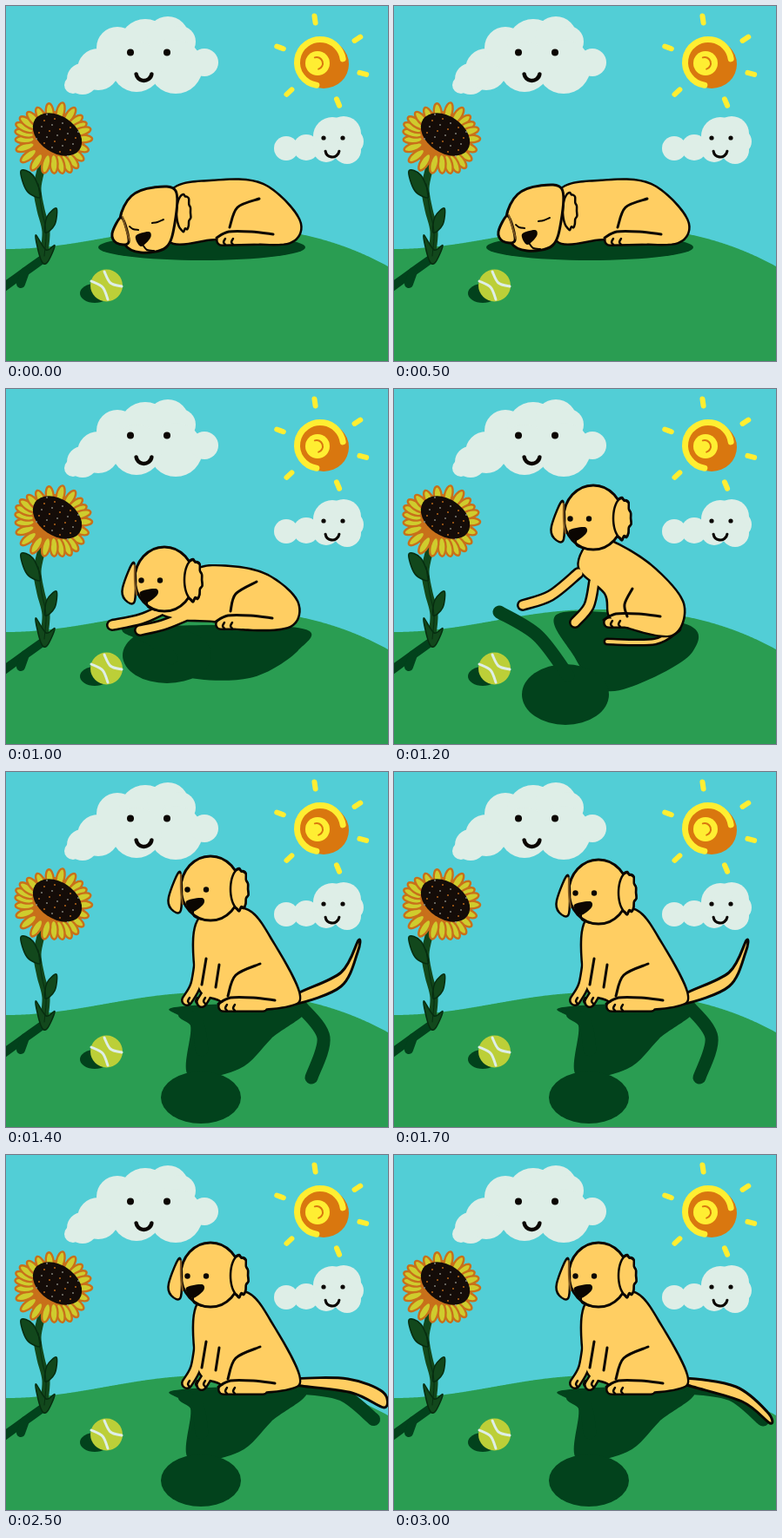
Write an HTML page with a canvas that moves like this. It is 439 px wide and 409 px high and loops after 3100 ms.

```html
<!DOCTYPE html>
<html lang="en">
<head>
<meta charset="utf-8">
<title>Sleepy puppy</title>
<style>
html, body { margin: 0; width: 100%; height: 100%; overflow: hidden; background: #52ced6; }
canvas { display: block; }
</style>
</head>
<body>
<canvas id="stage" width="439" height="409"></canvas>
<script>
const g = document.getElementById('stage').getContext('2d');
const INK = '#0b0602', FUR = '#ffce62', SHADE = '#02421c', CLOUD = '#deeee7', GRASS = '#2a9d52',
  YELLOW = '#ffee32', ORANGE = '#d9770f', STEM = '#12481c', VEIN = '#072d10';
const { PI, sin, cos, min, max, floor } = Math;
g.lineCap = g.lineJoin = 'round';

const clamp = (v, lo, hi) => max(lo, min(hi, v));
const nums = s => typeof s === 'string' ? s.split(' ').map(Number) : s;

// Blend neighbouring poses; u = 1.5 is halfway from the second to the third
function mix(poses, u) {
  const i = min(floor(u), poses.length - 2), b = nums(poses[i + 1]);
  return nums(poses[i]).map((v, j) => v + (b[j] - v) * (u - i));
}

// Smooth curve through the points
function trace(points, closed) {
  const p = nums(points), n = p.length / 2;
  const at = i => {
    i = closed ? (i + n) % n : clamp(i, 0, n - 1);
    return [p[2 * i], p[2 * i + 1]];
  };
  g.beginPath();
  g.moveTo(...at(0));
  for (let i = 0; i < (closed ? n : n - 1); i++) {
    const [a, b, c, d] = [at(i - 1), at(i), at(i + 1), at(i + 2)];
    g.bezierCurveTo(b[0] + (c[0] - a[0]) / 6, b[1] + (c[1] - a[1]) / 6,
      c[0] - (d[0] - b[0]) / 6, c[1] - (d[1] - b[1]) / 6, c[0], c[1]);
  }
}

function ink(color, width) {
  g.strokeStyle = color;
  g.lineWidth = width;
  g.stroke();
}

function fill(color) {
  g.fillStyle = color;
  g.fill();
}

function blob(p, color, edge, width = 3) {
  trace(p, true);
  fill(color);
  if (edge) ink(edge, width);
}

function line(p, width = 3, color = INK) {
  trace(p, false);
  ink(color, width);
}

function oval(x, y, rx, ry, color, turn = 0) {
  g.beginPath();
  g.ellipse(x, y, rx, ry, turn, 0, 2 * PI);
  fill(color);
}

function arc(x, y, r, from, to, width, color) {
  g.beginPath();
  g.arc(x, y, r, from, to);
  ink(color, width);
}

function shaggy(x, y, rx, ry) {
  const p = [];
  for (let i = 0; i < 24; i++) {
    const a = i * PI / 12, r = 1 + .1 * sin(i * 2.2) * (cos(a) > 0);
    p.push(x + rx * r * cos(a), y + ry * r * sin(a));
  }
  blob(p, FUR, INK, 2.5);
}

function shifted(x, y, draw) {
  g.save();
  g.translate(x, y);
  draw();
  g.restore();
}

// Puffs are triples of x, y, radius
function cloud(puffs, eyeX, eyeY, gap, eye, smileX, smileY, smile) {
  const p = nums(puffs);
  for (let i = 0; i < p.length; i += 3) oval(p[i], p[i + 1], p[i + 2], p[i + 2], CLOUD);
  oval(eyeX, eyeY, eye, eye, INK);
  oval(eyeX + gap, eyeY, eye, eye, INK);
  arc(smileX, smileY, smile, .05 * PI, .95 * PI, eye + .5, INK);
}

function sun() {
  for (const degrees of [-98, -160, -33, 15, 137, 67]) {
    const a = degrees * PI / 180, x = cos(a), y = sin(a);
    line([362 + 46 * x, 65 + 46 * y, 362 + 54 * x, 65 + 54 * y], 6, YELLOW);
  }
  oval(365, 67, 29, 28, ORANGE);
  arc(361, 65, 26.5, .55 * PI, 1.95 * PI, 7, YELLOW);
  oval(358, 66, 14, 14, YELLOW);
  arc(357, 66, 7, -.6 * PI, .4 * PI, 2, ORANGE);
}

function hill() {
  const crest = x => x < 230 ? 280 - 26 * sin(x / 230 * PI / 2) ** 2 : 254 + 46 * ((x - 230) / 209) ** 2.5;
  g.beginPath();
  g.moveTo(0, 409);
  for (let x = 0; x <= 439; x++) g.lineTo(x, crest(x));
  g.lineTo(439, 409);
  fill(GRASS);
}

function flower() {
  line('43 291 22 306 -4 325', 10, SHADE);
  line('22 306 17 320', 10, SHADE);
  line('41 185 36 210 40 235 46 260 43 290', 9, STEM);
  for (const leaf of ['17 190 31 195 40 220 24 213', '45 261 47 243 58 233 56 252', '40 292 34 264 46 281 56 276 47 296'])
    blob(leaf, STEM, VEIN, 1.5);
  line('37 205 41 235 46 260 44 288', 1, VEIN);

  oval(54, 153, 36, 32, '#c8701a');
  const petals = 23;
  for (let i = 0; i < petals; i++) {
    const a = (i + .4 * sin(i * 7)) * 2 * PI / petals, r = .74 + .04 * sin(i * 5);
    oval(54 + 46 * r * cos(a), 153 + 41 * r * sin(a), 11, 4.5, '#cfcc2d', a);
    ink('#c8701a', 2.4);
  }
  oval(59, 148, 31, 21, '#140c08', .6);
  for (let y = -2; y < 3; y++)
    for (let x = -2; x < 3; x++)
      oval(59 + x * 9 - y * 3, 149 + y * 7 + x * 5, .9, .9, (x + y) % 2 ? '#c8701a' : '#8b8d83');
}

function ball() {
  oval(102, 331, 17, 11, SHADE);
  oval(115.5, 322, 18.5, 18.5, '#bccf38');
  line('98 317 111 324 117 338', 3, CLOUD);
  line('113 306 120 319 133 323', 3, CLOUD);
}

function scenery() {
  g.fillStyle = '#52ced6';
  g.fillRect(0, 0, 439, 409);
  cloud('77 91 10 88 84 18 106 73 24 128 48 24 160 45 30 186 36 24 200 41 18 195 70 31 150 70 29 228 65 16',
    143, 53.5, 42, 4, 158.5, 77, 9);
  cloud('322 164 14 345 163 15 375 150 22 388 147 20 396 156 15 392 166 16 368 165 15',
    365, 152, 22, 2.6, 375, 166, 8);
  sun();
  hill();
  flower();
  ball();
}

// Torso and limbs share one outline
function silhouette(torso, limbs, thick) {
  for (const limb of limbs) line(limb, thick + 5);
  blob(torso, FUR, INK, 5);
  for (const limb of limbs) line(limb, thick, FUR);
  trace(torso, true);
  fill(FUR);
}

function toes(x, y, count) {
  for (; count--; x += 9) line([x, y, x - 2, y + 4, x, y + 7], 2.5);
}

function foot(x, y) {
  line([x - 6, y - 3, x + 8, y - 10, x + 34, y - 10, x + 59, y - 7]);
  toes(x + 4, y - 2, 2);
}

function lying(dx, dy, awake) {
  oval(225, 278, 119, 15, SHADE);
  silhouette('190 214 238 202 295 206 336 246 326 272 270 272 240 268 188 270', ['248 270 290 269'], 9);
  line('257 255 266 232 291 222');
  foot(248, 270);

  shifted(dx, dy, () => {
    shaggy(204, 238, 8, 21);
    blob('131 245 144 219 170 209 195 213 194 250 184 278 155 284 136 274', FUR, INK);
    blob('133 244 122 262 127 273 141 272', FUR, INK);
    line('134 243 142 270', 2, '#7b5520');
    blob('149 265 164 260 166 267 155 277', INK);
    line('157 275 162 281 170 282', 2);
    if (awake) {
      oval(148, 255, 3, 3, INK);
      oval(174, 249, 3, 3, INK);
    } else {
      line('142 254 146 257 152 258', 2);
      line('168 250 174 249 181 246', 2);
    }
  });
}

// Poses: stretched out, getting up, seated
const POSES = {
  torso: [
    '215 210 255 205 300 215 334 245 326 273 270 276 240 267 195 264 172 248',
    '230 172 258 180 300 208 332 248 319 283 265 273 248 261 243 235 213 205',
    '235 160 278 160 307 198 336 254 324 269 265 273 245 262 222 248 217 185'
  ],
  farLeg: ['180 254 155 265 122 272', '212 212 180 238 148 249', '223 215 218 245 208 263'],
  nearLeg: ['205 262 180 272 154 278', '230 222 224 250 208 269', '238 222 234 248 225 265'],
  foot: ['247 271', '247 269', '250 270'],
  haunch: ['258 256 264 236 288 222', '268 262 265 248 274 230', '255 258 264 234 292 221'],
  head: ['-53 81', '-6 10', '0 0'],
  shadow: [
    '150 275 165 295 200 330 280 333 336 301 335 275',
    '191 258 207 308 240 347 290 336 343 303 333 270',
    '194 271 212 292 210 350 268 342 305 307 341 270'
  ],
  headShadow: ['185 307 51 32', '197 352 50 35', '224 375 46 30'],
  armShadow: ['140 275 170 290 190 310', '121 257 165 284 200 330', '205 278 220 290 225 320'],
  tail: [
    '334 256 385 231 405 194 404 208 385 247 334 267',
    '334 259 393 249 437 250 437 273 395 264 334 266',
    '334 257 393 267 429 296 432 309 400 284 334 264'
  ],
  tailShadow: ['340 271 365 306 351 352', '340 268 385 276 421 304', '340 268 388 276 424 305']
};

function head(shut) {
  shaggy(268, 139, 10, 24);
  oval(235, 138, 34, 37, FUR);
  ink(INK, 3);
  shaggy(268, 139, 10, 23);
  blob('200 119 187 148 190 162 201 163', FUR, INK, 2.5);
  line('201 122 201 140 203 156', 2, '#7b5520');
  blob('207 153 225 149 227 156 214 165', INK);
  line('215 163 216 170 225 174', 2);
  for (const x of [208.5, 230])
    if (shut) line([x - 3, 139, x, 141, x + 3, 139], 2);
    else oval(x, 139.5, 3.2, 3.2, INK);
}

function rising(up, wag, shut, bounce) {
  const pose = name => mix(POSES[name], up), seated = up === 2;
  blob(pose('shadow'), SHADE);
  oval(...pose('headShadow'), SHADE);
  line(pose('armShadow'), 15, SHADE);
  if (seated) {
    line(mix(POSES.tailShadow, wag), 15, SHADE);
    blob(mix(POSES.tail, wag), FUR, INK);
  } else if (up > .4) {
    line('326 276 300 291 245 291', 9);
    line('326 276 300 291 245 291', 4, FUR);
  }
  const legs = [pose('farLeg'), pose('nearLeg')], [footX, footY] = pose('foot');
  silhouette(pose('torso'), [...legs, [footX, footY, footX + 45, footY]], 9);
  line(pose('haunch'));
  foot(footX, footY);
  if (seated) {
    for (const leg of legs) shifted(7, 0, () => line(leg.slice(0, 4)));
    toes(211, 260, 3);
  }
  const [x, y] = pose('head');
  shifted(x, y + bounce, () => head(shut));
}

function frame(now) {
  const n = floor(now / 100) % 31;
  scenery();
  if (n < 10) {
    const breath = 2 * min(n / 5, 1), wake = clamp((n - 5) / 3, 0, 1);
    lying(-breath, -breath - 8 * wake ** 2, n > 7);
  } else {
    const wag = n < 22 ? max(0, (n - 17) / 4) : 2 - .5 * sin(PI * clamp((28 - n) / 6, 0, 1));
    rising(min((n - 10) / 2, 2), wag, n > 16 && n % 5 === 4, n === 14 ? -4 : 0);
  }
}

const start = performance.now();
(function loop() {
  frame(performance.now() - start);
  requestAnimationFrame(loop);
})();
</script>
</body>
</html>
```
